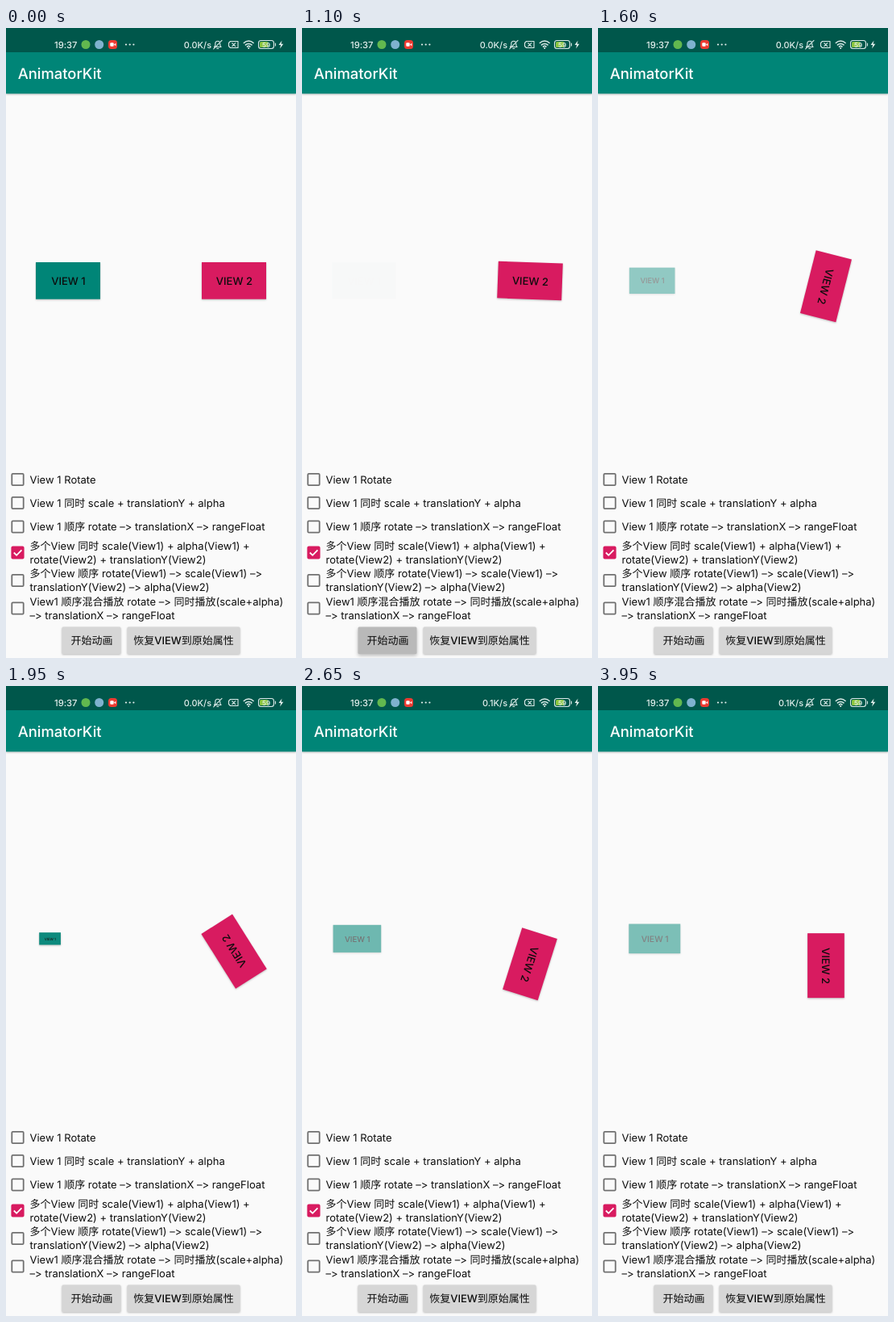
An HTML page that plays this animation: 360 by 780 pixels, repeating every 4000 ms.

```html
<!DOCTYPE html>
<html lang="zh-CN">
<head>
<meta charset="utf-8">
<title>AnimatorKit</title>
<style>
  html, body { margin: 0; width: 100%; height: 100%; overflow: hidden; background: #fafafa; }
  svg { display: block; width: 100%; height: 100%; }
  text {
    font: 13px Inter, 'Noto Sans CJK SC', 'Noto Sans CJK', sans-serif;
    font-variant-ligatures: none;
    font-feature-settings: 'calt' 0;
    text-rendering: geometricPrecision;
    fill: #0c0c0c;
    white-space: pre;
  }
  .medium { font-weight: 500; text-anchor: middle; }
  .status text { font-size: 11.2px; font-weight: 500; fill: #e4efed; }
  .line { fill: none; stroke: #dceae8; stroke-width: 1.1; stroke-linecap: round; stroke-linejoin: round; }
  .raised { filter: drop-shadow(0 1px 1px rgba(0, 0, 0, .24)); }
</style>
</head>
<body>
<svg viewBox="0 0 360 780">
  <rect width="360" height="780" fill="#fafafa"/>
  <rect y="30" width="360" height="51.3" fill="#008577" class="raised"/>
  <rect width="360" height="30" fill="#00574b"/>
  <text x="14.7" y="63" style="font-size:18.4px;font-weight:500;fill:#fff">AnimatorKit</text>

  <g class="status">
    <text x="60" y="24.5">19:37</text>
    <circle cx="99" cy="20.5" r="5.5" fill="#62b84f"/>
    <circle cx="115.7" cy="20.5" r="5.5" fill="#7fb2cf"/>
    <rect x="127" y="15" width="11" height="11" rx="3.5" fill="#ed3b32"/>
    <rect x="129.3" y="18.3" width="4.4" height="4.4" rx="1" fill="#fff"/>
    <path d="M134 20.5l2.3-1.7v3.4z" fill="#fff"/>
    <g fill="#e4efed"><circle cx="149" cy="20.5" r="1.1"/><circle cx="153.7" cy="20.5" r="1.1"/><circle cx="158.4" cy="20.5" r="1.1"/></g>
    <text id="speed" x="255" y="24.5" text-anchor="end" style="font-size:10.9px">0.0K/s</text>
    <path class="line" d="M258.5 23.5h8.5l-1.2-2v-2.3a3 3 0 0 0-6 0v2.3zM261.8 25.5h2M257.7 25.8L268 15.3"/>
    <path class="line" d="M278.5 16.5h9.5v8h-9.5l-2-2v-4zM280.7 18.7l4 4m0-4l-4 4"/>
    <path class="line" style="stroke-width:1.5" d="M295.3 18.5a8.5 8.5 0 0 1 11.8 0M297.4 20.9a5.5 5.5 0 0 1 7.6 0M299.4 23.1a2.6 2.6 0 0 1 3.6 0"/>
    <circle cx="301.2" cy="25" r="1" fill="#e4efed"/>
    <rect class="line" x="313.5" y="15.5" width="19" height="10" rx="3"/>
    <rect x="315" y="17" width="10.5" height="7" rx="1.5" fill="#8cc63f"/>
    <path class="line" d="M334.5 19v3"/>
    <text x="323" y="23.5" text-anchor="middle" style="font-size:8px;font-weight:600">59</text>
    <path d="M342.5 15.5l-4 5.6h2.6l-1 4.4 4.2-5.7h-2.7z" fill="#e4efed"/>
  </g>

  <g id="view1" class="raised"><g>
    <rect x="37" y="290" width="80" height="45.7" fill="#008577"/>
    <text class="medium" x="77.5" y="318">VIEW 1</text>
  </g></g>
  <g id="view2" class="raised"><g>
    <rect x="243" y="290" width="80" height="45.7" fill="#d81b60"/>
    <text class="medium" x="283.4" y="318">VIEW 2</text>
  </g></g>

  <g id="options"></g>

  <g id="start">
    <rect x="69.5" y="741.5" width="73" height="33.5" rx="1.5"/>
    <text class="medium" x="106.5" y="763.3">开始动画</text>
  </g>
  <g class="raised">
    <rect x="150.5" y="741.5" width="140" height="33.5" rx="1.5" fill="#d6d6d6"/>
    <text class="medium" x="220.5" y="763.3">恢复VIEW到原始属性</text>
  </g>
</svg>
<script>
const LOOP = 4000, START = 1022, DURATION = 1918;
const CHECKED = 3;
const $ = id => document.getElementById(id);

const options = [
  [559, 'View 1 Rotate'],
  [588, 'View 1 同时 scale + translationY + alpha'],
  [617.5, 'View 1 顺序 rotate –> translationX –> rangeFloat'],
  [649.5, '多个View 同时 scale(View1) + alpha(View1) +', 'rotate(View2) + translationY(View2)'],
  [684, '多个View 顺序 rotate(View1) –> scale(View1) –>', 'translationY(View2) –> alpha(View2)'],
  [718.5, 'View1 顺序混合播放 rotate –> 同时播放(scale+alpha)', '–> translationX –> rangeFloat'],
];

$('options').innerHTML = options.map(([y, ...lines], i) => {
  const on = i === CHECKED;
  const box = `<rect x="7.3" y="${y - 7.2}" width="14.4" height="14.4" rx="1.2"
    fill="${on ? '#d81b60' : 'none'}" stroke="${on ? '#d81b60' : '#707070'}" stroke-width="1.8"/>`;
  const tick = on ? `<path d="M9.8 ${y}l3.3 3.3 6.3-6.5" fill="none" stroke="#fff" stroke-width="1.8"/>` : '';
  const top = y + 4.6 - (lines.length - 1) * 8.6;
  const label = lines.map((line, n) =>
    `<text x="29.5" y="${top + n * 17.2}">${line.replace(/>/g, '&gt;')}</text>`).join('');
  return box + tick + label;
}).join('');

const clamp = v => Math.min(1, Math.max(0, v));
const mix = (a, b, p) => a + (b - a) * p;
const keyframes = (p, a, b, c) => p < .5 ? mix(a, b, p * 2) : mix(b, c, p * 2 - 1);

function draw(now) {
  const t = now % LOOP;
  const p = (1 - Math.cos(Math.PI * clamp((t - START) / DURATION))) / 2;

  const scale = keyframes(p, 1, .3, .8);
  $('view1').style.opacity = t < START ? 1 : keyframes(p, 0, 1, .5);
  $('view1').firstElementChild.setAttribute('transform',
    `translate(43.3 312.8) scale(${scale}) translate(-43.3 -312.8)`);

  const angle = keyframes(p, 0, 250, 90);
  $('view2').firstElementChild.setAttribute('transform',
    `translate(0 ${p * 100 / 3}) rotate(${angle} 283 312.8)`);

  const press = Math.min(clamp((t - 850) / 150), clamp((1450 - t) / 300));
  const grey = mix(214, 185, press);
  $('start').firstElementChild.style.fill = `rgb(${grey},${grey},${grey})`;
  $('start').style.filter =
    `drop-shadow(0 ${1 + press}px ${1 + press}px rgba(0,0,0,.26))`;

  $('speed').textContent = t < 2650 ? '0.0K/s' : '0.1K/s';
  requestAnimationFrame(draw);
}
requestAnimationFrame(draw);
</script>
</body>
</html>
```
